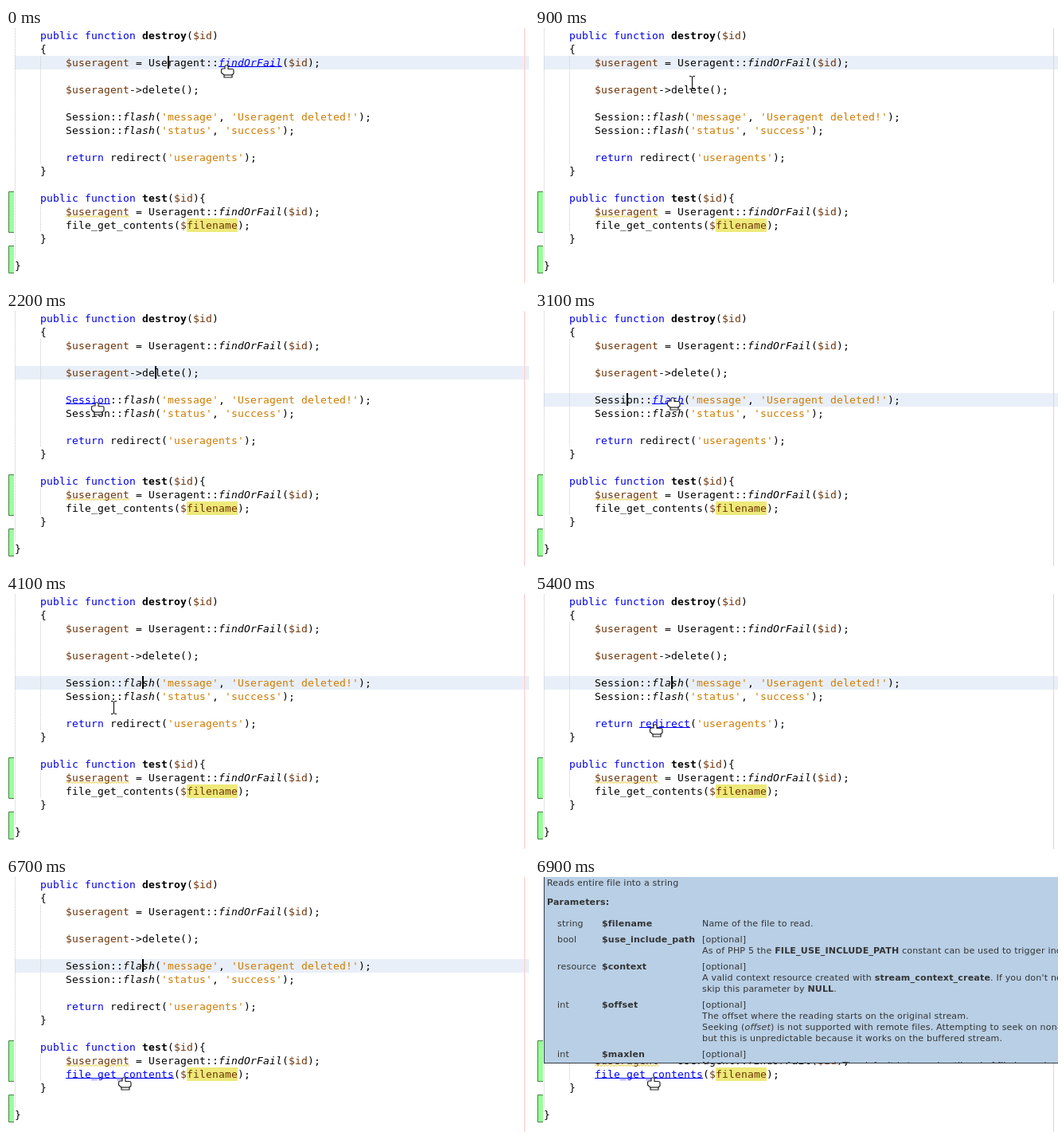
Recreate the animation shown at these times as an HTML page. Size 657 px wide and 320 px high, loop 8000 ms.

```html
<!DOCTYPE html>
<html lang="en">
<meta charset="utf-8">
<title>Code editor</title>
<style>
html, body { margin: 0; width: 100%; height: 100%; overflow: hidden; background: #fff; }
svg, pre, #doc { position: absolute; left: 0; top: 0; }
svg { width: 657px; height: 320px; }
pre { left: 11px; top: 1px; margin: 0; color: #000; font: 13px/17px "DejaVu Sans Mono", monospace; letter-spacing: .173px; }
.k { color: #0000e6; }
.v { color: #6d3206; }
.s { color: #ce7b00; }
.mark { background: #eeea7a; box-shadow: 0 1px #eeea7a, 0 -1px #eeea7a; }
.on { color: #00f; text-decoration: underline 1px; text-underline-offset: 0px; text-decoration-skip-ink: none; }
.guide { stroke: #c8c8c8; stroke-dasharray: 1 1; }
.added { fill: #99ff99; stroke: #468246; }
#doc { left: 11px; top: -10px; width: 700px; height: 242px; overflow: hidden; border: 1px solid #333c46;
  background: #b8cfe5; color: #333; font: 11px/14px "DejaVu Sans", sans-serif; letter-spacing: .2px; white-space: nowrap; }
#doc p { margin: 0 3px; padding-top: 10px; }
#doc dl { display: grid; grid-template-columns: 56px 126px auto; row-gap: 6px; margin: 13px 16px; }
#doc dd { margin: 0; }
</style>
<body>
<svg>
  <rect id="row" x="11" width="646" height="17" fill="#e9eff8"/>
  <path d="M651.5 0V320" stroke="#ffc8c8"/>
  <path class="guide" d="M11.5 0V290M43.5 35V171M43.5 222V256"/>
  <path class="added" d="M10 205.5H3.5V256.5H10M10 273.5H3.5V307.5H10"/>
  <path id="wave" fill="none" stroke="#e3c21c"/>
  <rect id="caret" width="2" height="16"/>
</svg>
<pre>
    <span class="k">public function</span> <b>destroy</b>(<span class="v">$id</span>)
    {
        <span class="v">$useragent</span> = Useragent::<i><a>findOrFail</a></i>(<span class="v">$id</span>);

        <span class="v">$useragent</span>-&gt;<a>delete</a>();

        <a>Session</a>::<i><a>flash</a></i>(<span class="s">'message'</span>, <span class="s">'Useragent deleted!'</span>);
        Session::<i>flash</i>(<span class="s">'status'</span>, <span class="s">'success'</span>);

        <span class="k">return</span> <a>redirect</a>(<span class="s">'useragents'</span>);
    }

    <span class="k">public function</span> <b>test</b>(<span class="v">$id</span>){
        <span class="v">$useragent</span> = Useragent::<i>findOrFail</i>(<span class="v">$id</span>);
        <a>file_get_contents</a>(<span class="v">$<span class="mark">filename</span></span>);
    }

}
</pre>
<div id="doc">
  <p>Reads entire file into a string</p>
  <p><b>Parameters:</b></p>
  <dl>
    <dd>string</dd><dd><b>$filename</b></dd>
    <dd>Name of the file to read.</dd>
    <dd>bool</dd><dd><b>$use_include_path</b></dd>
    <dd>[optional]<br>As of PHP 5 the <b>FILE_USE_INCLUDE_PATH</b> constant can be used to trigger include</dd>
    <dd>resource</dd><dd><b>$context</b></dd>
    <dd>[optional]<br>A valid context resource created with <b>stream_context_create</b>. If you don't need to<br>
      skip this parameter by <b>NULL</b>.</dd>
    <dd>int</dd><dd><b>$offset</b></dd>
    <dd>[optional]<br>The offset where the reading starts on the original stream.<br>
      Seeking (<i>offset</i>) is not supported with remote files. Attempting to seek on non-local<br>
      but this is unpredictable because it works on the buffered stream.</dd>
    <dd>int</dd><dd><b>$maxlen</b></dd>
    <dd>[optional]<br>Maximum length of data read. The default is to read until end of file is reached.</dd>
  </dl>
</div>
<svg>
  <g id="pointer">
    <g id="hand" fill="#fff" stroke="#222" stroke-width="1.2" stroke-linejoin="round">
      <path d="M-2 4V1Q0-1.5 2 1V4.5H7Q9 4.5 9 6.5V10L7 12V15H-3V12L-6.5 9V6Q-6.5 4-4 4Z"/>
      <path d="M-3 12H7"/>
    </g>
    <path id="beam" fill="none" stroke="#000" d="M-3-7.5H-1L.5-6.5 2-7.5H4M.5-6.5V7.5M-3 8.5H-1L.5 7.5 2 8.5H4"/>
  </g>
</svg>
<script>
const $ = id => document.getElementById(id);
const LOOP = 8000, STEP = 100, BLINK = 305, BOW = 25;
const links = document.querySelectorAll("pre a");

// The pointer travels from leave to arrive; its link stays lit until drop.
const stops = [
  { leave: -1, arrive: 0, drop: 200, x: 277, y: 47 },
  { leave: 600, arrive: 1100, drop: 1500, x: 190, y: 79, click: 1400 },
  { leave: 1700, arrive: 2200, drop: 2600, x: 114, y: 115, click: 2485 },
  { leave: 2500, arrive: 2800, drop: 3500, x: 173, y: 109, click: 3485 },
  { leave: 3700, arrive: 4400, drop: 5700, x: 151, y: 164 },
  { leave: 5600, arrive: 6200, drop: 6500, x: 149, y: 254 },
  { leave: 6500, arrive: 6700, drop: LOOP, x: 148, y: 252 },
];
const firstClick = { x: 203, y: 43, click: -225 };

function pointerAt(t) {
  const i = stops.findLastIndex(s => s.leave <= t);
  const to = stops[i], from = stops[i - 1] || to;
  const p = Math.min(1, (t - to.leave) / (to.arrive - to.leave));
  const ease = p * p * (3 - 2 * p);
  const bow = Math.abs(to.y - from.y) > 5 ? BOW * Math.sin(Math.PI * p) : 0;
  return [from.x + (to.x - from.x) * ease - bow, from.y + (to.y - from.y) * ease].map(Math.round);
}

const show = (el, on) => el.style.display = on ? "" : "none";

function draw(now) {
  const t = Math.floor(now % LOOP / STEP) * STEP;
  const lit = stops.findIndex(s => s.arrive <= t && t < s.drop);
  const link = Math.min(lit, links.length - 1);
  links.forEach((a, i) => a.className = i === link ? "on" : "");
  show($("hand"), lit >= 0);
  show($("beam"), lit < 0);
  $("pointer").setAttribute("transform", `translate(${pointerAt(t)})`);

  // The caret lands on the clicked cell and blinks from then on.
  const { x, y, click } = stops.findLast(s => s.click <= t) || firstClick;
  const top = 1 + 17 * Math.floor((y - 1) / 17);
  $("row").setAttribute("y", top);
  $("caret").setAttribute("x", 11 + 8 * Math.round((x - 11) / 8));
  $("caret").setAttribute("y", top);
  show($("caret"), Math.floor((t - click) / BLINK) % 2 === 0);
  show($("doc"), t >= 6900);
}

$("wave").setAttribute("d", "M75 237.5" + "l2-2l2 2".repeat(20));
const start = performance.now();
function tick() {
  draw(performance.now() - start);
  requestAnimationFrame(tick);
}
tick();
</script>
</body>
</html>
```
